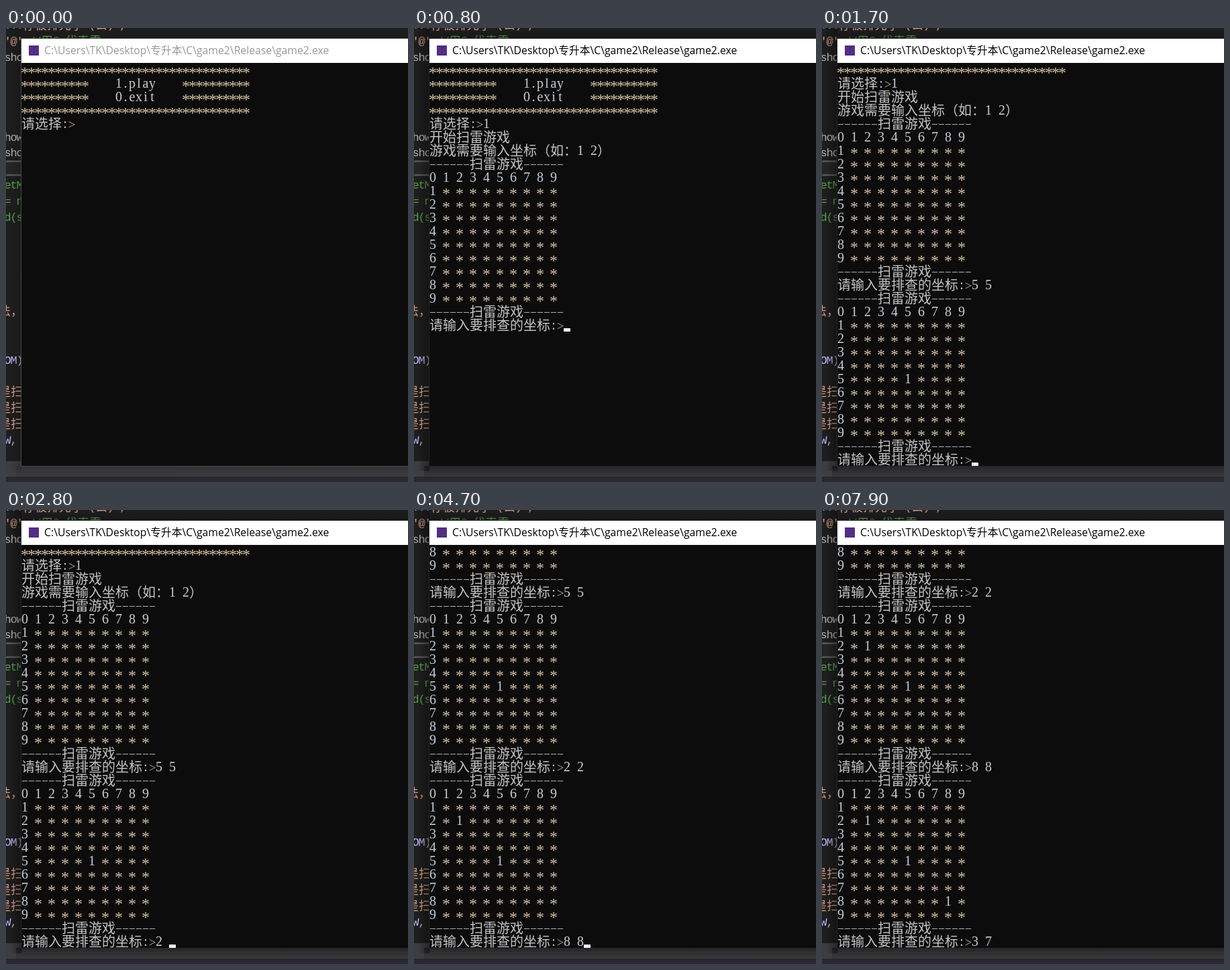
Recreate the animation shown at these times as an HTML page. Size 599x676 px, loop 8000 ms.

```html
<!DOCTYPE html>
<html lang="zh-CN">
<head>
<meta charset="utf-8">
<title>Console minesweeper</title>
<style>
html, body { margin: 0; width: 100%; height: 100%; overflow: hidden; background: #1e1e1e; }
svg { display: block; width: 599px; height: 676px; }
.title { font: 15.75px "Open Sans", "Noto Sans CJK SC", sans-serif; }
.half { font-family: "Liberation Serif", serif; text-anchor: middle; }
.code { font-family: "Liberation Mono", monospace; text-anchor: middle; }
.wide { font-family: "Noto Sans CJK SC", "Noto Sans CJK", sans-serif; font-weight: 300; }
</style>
</head>
<body>
<svg viewBox="0 0 599 676">
  <defs>
    <linearGradient id="left"><stop offset="0" stop-opacity="0"/><stop offset="1" stop-opacity=".35"/></linearGradient>
    <linearGradient id="top" x2="0" y2="1"><stop offset="0" stop-opacity="0"/><stop offset="1" stop-opacity=".25"/></linearGradient>
    <linearGradient id="bottom" x2="0" y2="1"><stop offset="0" stop-opacity=".4"/><stop offset="1" stop-opacity="0"/></linearGradient>
  </defs>
  <rect width="599" height="676" fill="#1e1e1e"/>
  <rect y="197" width="23" height="23" fill="#252526"/>
  <path d="M0 198.5H23M0 219H23" stroke="#58585a" stroke-width="2.5"/>
  <rect y="645" width="599" height="23" fill="#3e3e42"/>
  <rect y="668" width="599" height="4" fill="#2a282c"/>
  <rect y="672" width="599" height="4" fill="#2d2636"/>
  <g id="editor"></g>
  <g id="shadow">
    <rect x="5" width="18" height="660" fill="url(#left)"/>
    <rect x="23" width="576" height="16" fill="url(#top)"/>
    <rect x="15" y="652" width="584" height="20" fill="url(#bottom)"/>
  </g>
  <rect id="edge" x="22" y="15" width="580" height="638"/>
  <rect x="23" y="16" width="576" height="36" fill="#fff"/>
  <rect x="34" y="26" width="15" height="15" fill="#512f82"/>
  <text id="title" class="title" x="57" y="39">C:\Users\TK\Desktop\专升本\C\game2\Release\game2.exe</text>
  <rect x="23" y="52" width="576" height="600" fill="#0c0c0c"/>
  <g id="screen"></g>
  <rect id="cursor" width="10" height="5" fill="#f2f2f2"/>
</svg>
<script>
const LOOP = 8000, LEFT = 23, TOP = 52, CELL = 10, ROW = 20, ROWS = 30;
const $ = id => document.getElementById(id);

// time, number of boards shown, typed input, cursor visible
const steps = [
  [0, 0, '', 0], [600, 0, '1', 1],
  [800, 1, '', 1], [1300, 1, '5', 1], [1400, 1, '5 ', 1], [1500, 1, '5 5', 1], [1600, 1, '5 5', 0],
  [1700, 2, '', 1], [2600, 2, '', 0], [2800, 2, '2 ', 1], [2900, 2, '2 2', 1],
  [3100, 3, '', 1], [4100, 3, '', 0], [4500, 3, '8', 1], [4600, 3, '8 ', 1], [4700, 3, '8 8', 1],
  [4900, 4, '', 1], [5500, 4, '', 0], [6000, 4, '', 1], [6500, 4, '', 0],
  [6900, 4, '3', 1], [7000, 4, '3 ', 1], [7400, 4, '3 ', 0], [7800, 4, '3 7', 1], [7900, 4, '3 7', 0]
];
const moves = [5, 2, 8];   // each move opens the cell (n, n)

const isWide = ch => ch > '\u2fff';
const width = s => [...s].reduce((n, ch) => n + (isWide(ch) ? 2 : 1), 0);

function glyph(ch, cls, x, y, size, fill) {
  return `<text class="${cls}" x="${x}" y="${y}" font-size="${size}" fill="${fill}">${ch}</text>`;
}

// Lays a string out on the character grid
function layout(s, x, cell, draw) {
  let out = '';
  for (const ch of s) {
    if (ch !== ' ') out += draw(ch, x);
    x += cell * (isWide(ch) ? 2 : 1);
  }
  return out;
}

function consoleLine(s, row) {
  const y = TOP + row * ROW + 17;
  return layout(s, LEFT, CELL, (ch, x) => {
    const mid = x + CELL / 2;
    if (isWide(ch)) return glyph(ch, 'wide', x, y + .5, 20, '#c4c4c4');
    if (ch === '*') return glyph(ch, 'half', mid, y + 4.5, 24, '#d8c3a6');
    if (ch === '-') return glyph('–', 'half', mid, y - 2, 16, '#ccc');
    if (ch === '>') return glyph('&gt;', 'half', mid, y + .5, 19, '#c9ac88');
    return glyph(ch, 'half', mid, y, 20, '#c9cfd6');
  });
}

function codeLine(s, x, mid, fill) {
  return layout(s, x, 9, (ch, cx) => isWide(ch)
    ? glyph(ch, 'wide', cx, mid + 6.5, 18, fill)
    : glyph(ch, 'code', cx + 4.5, mid + 6, 17, fill));
}

function board(opened) {
  const rule = '------扫雷游戏------';
  const lines = [rule, '0 1 2 3 4 5 6 7 8 9'];
  for (let r = 1; r <= 9; r++) {
    let s = '' + r;
    for (let c = 1; c <= 9; c++) s += r === c && opened.includes(r) ? ' 1' : ' *';
    lines.push(s);
  }
  return [...lines, rule];
}

function history(boards, input) {
  const stars = '*'.repeat(34), side = '*'.repeat(10);
  const lines = [stars, `${side}    1.play    ${side}`, `${side}    0.exit    ${side}`, stars,
    '请选择:>' + (boards ? '1' : input)];
  if (boards) lines.push('开始扫雷游戏', '游戏需要输入坐标（如：1 2）');
  for (let i = 0; i < boards; i++) {
    const typed = i < boards - 1 ? `${moves[i]} ${moves[i]}` : input;
    lines.push(...board(moves.slice(0, i)), '请输入要排查的坐标:>' + typed);
  }
  return lines.slice(-ROWS);
}

function drawEditor() {
  const grey = '#b4b4b4', green = '#57a64a', tan = '#d69d85', violet = '#beb7ff';
  $('editor').innerHTML = [
    ['...存被排元字 (公)\';', -2, -5, tan], ["'@'", -2, 19, tan], ['//用@ 代表雷', 34, 19, green],
    ['sho', -2, 43, grey], ['how', -2, 162, grey], ['sho', -2, 185, grey],
    ['etM', -2, 233, green], ['= n', -2, 257, green], ['d(s', -2, 281, green],
    ['法，', -11, 421, tan], ['OM', -2, 494, violet], [')', 16, 494, grey],
    ['是扫', -11, 541, tan], ['是扫', -11, 565, tan], ['是扫', -11, 589, tan],
    ['W', -2, 613, violet], [',', 7, 613, grey]
  ].map(line => codeLine(...line)).join('');
}

let shown = null;
function render(t) {
  const active = t >= 200;
  $('title').setAttribute('fill', active ? '#000' : '#999');
  $('edge').setAttribute('fill', active ? '#262626' : '#4a4a4a');
  $('shadow').setAttribute('opacity', active ? 1 : .45);

  const step = steps.findLast(s => s[0] <= t);
  if (step === shown) return;
  shown = step;
  const [, boards, input, on] = step;
  const lines = history(boards, input);
  $('screen').innerHTML = lines.map(consoleLine).join('');
  const last = lines.length - 1;
  $('cursor').setAttribute('x', LEFT + CELL * width(lines[last]));
  $('cursor').setAttribute('y', TOP + last * ROW + 15);
  $('cursor').setAttribute('opacity', on);
}

drawEditor();
const start = performance.now();
function tick() {
  render((performance.now() - start) % LOOP);
  requestAnimationFrame(tick);
}
tick();
</script>
</body>
</html>
```
